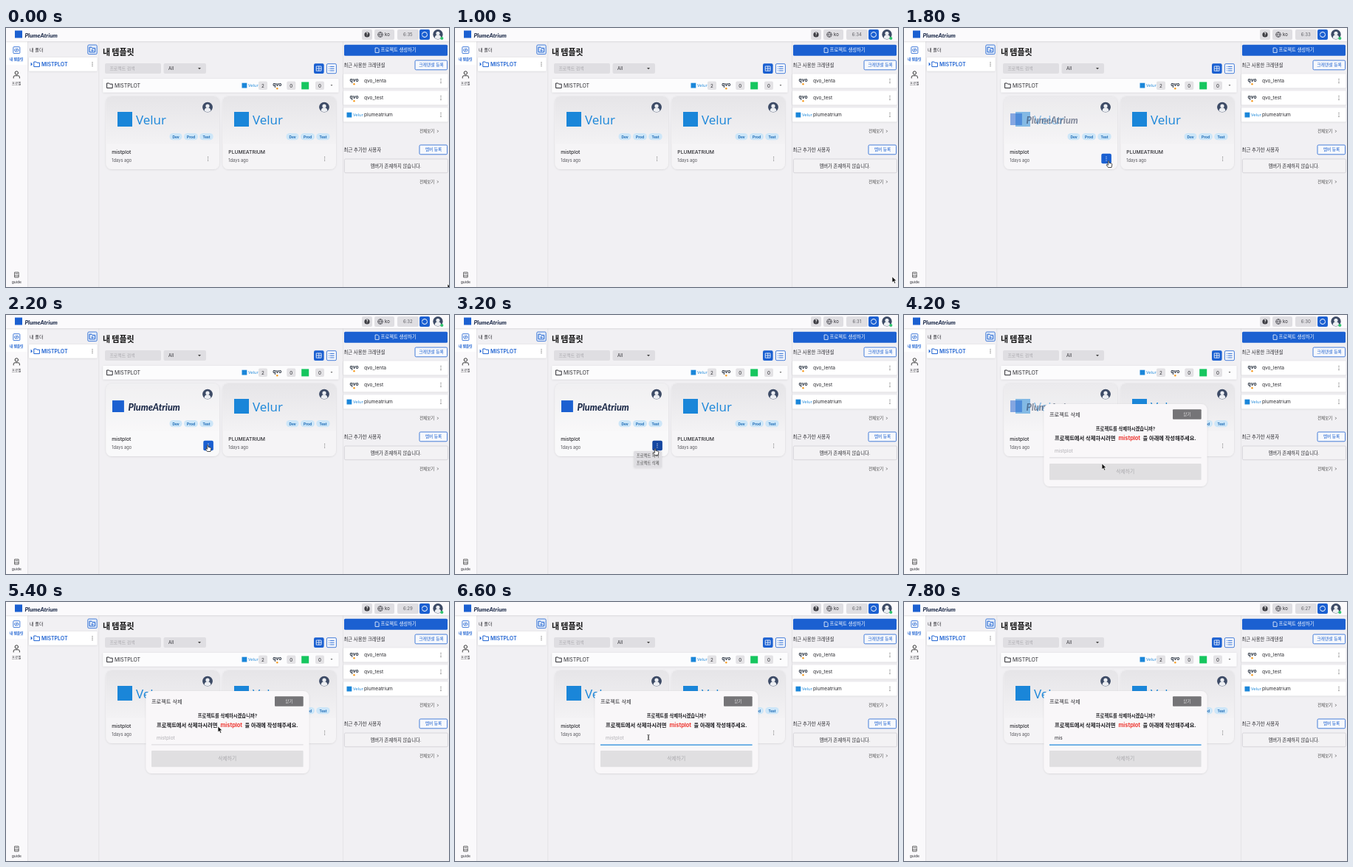
An HTML page for the animation above (8 s loop, 600 by 352 pixels).

```html
<!DOCTYPE html>
<html lang="ko">
<head>
<meta charset="utf-8">
<title>템플릿</title>
<style>
html, body { margin: 0; height: 100%; overflow: hidden; background: #f1f0f3; }
svg { display: block; width: 100vw; height: 100vh; }
text { font-family: Inter, "Noto Sans CJK KR", "Noto Sans CJK", sans-serif; white-space: pre; }
.brand { font-family: Lato, sans-serif; font-style: italic; }
.vendor { font-family: "Open Sans", sans-serif; }
</style>
</head>
<body>
<svg id="stage" viewBox="0 0 600 352"></svg>
<script>
const BLUE = '#1b60d1', INK = '#2b2b30', SKY = '#1a86d9', FIELD = '#dfdee2', SOFT = 'filter="url(#soft)"';

const rect = (x, y, w, h, fill, r = 0, extra = '') =>
  `<rect x="${x}" y="${y}" width="${w}" height="${h}" fill="${fill}" rx="${r}" ${extra}/>`;
const outline = (x, y, w, h, stroke, r = 1.5, fill = '#f6f8fc') =>
  rect(x, y, w, h, fill, r, `stroke="${stroke}" stroke-width=".8"`);
const circle = (x, y, r, fill, extra = '') => `<circle cx="${x}" cy="${y}" r="${r}" fill="${fill}" ${extra}/>`;
const line = (d, stroke = INK, w = .8, fill = 'none') =>
  `<path d="${d}" stroke="${stroke}" stroke-width="${w}" fill="${fill}" stroke-linecap="round" stroke-linejoin="round"/>`;
const shape = (d, fill) => `<path d="${d}" fill="${fill}"/>`;
const text = (x, y, size, str, fill = INK, weight = 400, anchor = 'start', extra = '') =>
  `<text x="${x}" y="${y}" font-size="${size}" fill="${fill}" font-weight="${weight}" text-anchor="${anchor}" ${extra}>${str}</text>`;
const mid = (x, y, size, str, fill, weight) => text(x, y, size, str, fill, weight, 'middle');
const group = (id, body, extra = '') => `<g id="${id}" ${extra}>${body}</g>`;

const dots = (x, y, fill = '#444') => [-2.4, 0, 2.4].map(d => circle(x, y + d, .6, fill)).join('');
const folder = (x, y, c) => line(`M${x} ${y}h2.6l1 1.2h3.6v5.4h-7.2z`, c, 1);
const caret = (x, y, s = 2) => shape(`M${x - s} ${y - 1}h${2 * s}l${-s} ${s * 1.1}z`, '#444');
const avatar = (x, y, r) => circle(x, y, r, '#3d4b66') +
  circle(x, y - r * .22, r * .38, '#eceef2') +
  shape(`M${x - r * .66} ${y + r * .7}q${r * .1} ${-r * .62} ${r * .66} ${-r * .62}t${r * .66} ${r * .62}q${-r * .66} ${r * .5} ${-r * 1.32} 0z`, '#eceef2');

const brand = (x, y, s) => rect(x, y - 10 * s, 10 * s, 10 * s, BLUE) +
  text(x + 13.5 * s, y - s, 7.9 * s, 'PlumeAtrium', '#1d2b4a', 800, 'start', 'class="brand"');
const velur = (x, y, s) => rect(x, y - 18.5 * s, 20 * s, 20 * s, SKY) +
  text(x + 25 * s, y - 1.5 * s, 17 * s, 'Velur', SKY, 400, 'start', 'class="vendor"');
const qvo = (x, y) => text(x, y, 6.6, 'qvo', '#252f3e', 700, 'middle', 'class="vendor"') + circle(x, y + 3.2, 1.2, '#f79a1c');

function header() {
  return rect(0, 0, 600, 18, '#fbfafc', 0, SOFT) + brand(12, 13.5, 1) +
    rect(482, 2, 14, 14, FIELD, 2) + circle(489, 9, 3.6, '#3c3c42') + mid(489, 11.1, 5.6, '?', '#fff', 700) +
    rect(499, 2, 27, 14, FIELD, 2) + circle(507, 9, 3.4, 'none', 'stroke="#3c3c42" stroke-width=".7"') +
    line('M503.6 9h6.8M507 5.6q-3.2 3.4 0 6.8q3.2-3.4 0-6.8', '#3c3c42', .6) + text(513, 11.2, 6, 'ko') +
    rect(530, 2, 29, 14, FIELD, 2) + text(544.3, 11.2, 6, '', '#606066', 400, 'middle', 'id="clock"') +
    rect(560, 2, 14, 14, BLUE, 2) + circle(567, 9, 3.5, 'none', 'stroke="#fff" stroke-width="1" stroke-dasharray="10 1"') +
    avatar(585, 8.8, 6.7) + circle(590.3, 14, 2.1, '#2fc56d');
}

function sidebar() {
  return rect(0, 18, 29, 334, '#faf9fb') + rect(0, 19, 29, 31, '#fff') + rect(29, 18.7, .7, 334, '#dedde0') +
    outline(9.8, 25.6, 9, 9, BLUE, 1) + line('M12.9 28.3l-1.4 1.8 1.4 1.8M15.7 28.3l1.4 1.8-1.4 1.8M14.7 28.1l-.8 4', BLUE, .9) +
    mid(14.2, 44.2, 4.7, '내 템플릿', BLUE, 600) +
    circle(14.3, 61, 2.2, 'none', 'stroke="#333" stroke-width="1"') + line('M10.2 68v-1.2q0-2 2-2h4.2q2 0 2 2v1.2', '#333', 1) +
    mid(14.2, 77, 4.6, '프로필') +
    line('M11.6 338.5v-6.5h5.5v6.5zM11.6 336.8h5.5M13 334h2.7', '#444', .8) + mid(14.3, 347, 5, 'guide');
}

function folders() {
  return text(32, 32, 6.1, '내 폴더') + outline(110.8, 23, 12.4, 12.6, BLUE, 1.5, '#e3ecf9') + folder(113.4, 26.2, BLUE) +
    line('M117 28.8v3M115.5 30.3h3', BLUE, .7) +
    rect(31, 40, 92.5, 18.5, '#fff', 1, SOFT) + shape('M33.6 46.6l2.3 2.6-2.3 2.6z', BLUE) +
    folder(38.2, 46, BLUE) + text(48, 51.6, 7, 'MISTPLOT', BLUE, 600) + dots(117, 49.2) +
    rect(125.5, 18.7, .7, 334, '#dedde0');
}

function card(x, title, logo) {
  const tag = (dx, w, s) => rect(x + dx, 143, w, 9.3, '#cde6f8', 4.6) + mid(x + dx + w / 2, 149.5, 4.8, s, '#1767b4', 700);
  return rect(x + .4, 93, 153.6, 99, '#f5f4f6', 8, SOFT) +
    shape(`M${x + .4} 157.5V101q0-8 8-8h137.6q8 0 8 8v56.5z`, 'url(#shade)') +
    logo + avatar(x + 138, 107.6, 6.9) + tag(86.5, 17, 'Dev') + tag(106, 19, 'Prod') + tag(127.2, 18.5, 'Test') +
    text(x + 8.3, 170.8, 6.8, title, INK, 500) + text(x + 8.3, 182, 5.7, '1days ago', '#55555a') + dots(x + 138.6, 177.8, '#777');
}

function main() {
  const count = (x, n) => rect(x, 72.5, 12, 11.5, '#e3e2e5', 2) + mid(x + 6, 80.6, 6.2, n);
  const glow = rect(135.4, 93, 153.6, 99, '#fff', 8, 'id="glow"');
  return text(131, 37.2, 11, '내 템플릿', '#111', 900) +
    rect(134, 48, 76, 14, FIELD, 2) + text(140.4, 57.2, 5.9, '프로젝트 검색', '#a9a8ad') +
    rect(213.5, 48, 57.5, 14, FIELD, 2) + text(220, 57.2, 6, 'All') + caret(262, 55) +
    rect(417, 48.3, 13.6, 13.6, BLUE, 2) + line('M420.6 52h6.4v6.2h-6.4zM423.8 52v6.2M420.6 55.1h6.4', '#fff') +
    outline(434.4, 48.7, 13, 13, BLUE) + line('M439.2 52.4h5M439.2 55.2h5M439.2 58h5M437.3 52.4h.1M437.3 55.2h.1M437.3 58h.1', BLUE, .9) +
    rect(131.3, 69, 319.2, 18.5, '#fcfcfd', 1, SOFT) + folder(137, 75, INK) +
    text(147, 80.6, 7, 'MISTPLOT') + velur(319.5, 81, .34) + count(342, 2) + qvo(367.3, 79) + count(380.3, 0) +
    rect(400.2, 73.4, 10, 10, '#16c65f') + count(419, 0) + caret(441, 78.3, 1.4) +
    card(135, 'mistplot', glow + group('plain', velur(151, 132.5, 1)) + group('swap', brand(144, 132, 1.59))) +
    card(293, 'PLUMEATRIUM', velur(309, 132.5, 1)) +
    group('more', rect(267.3, 170.7, 13.6, 13.6, BLUE, 2, 'id="moreBox"') + dots(274, 177.6, '#fff'));
}

function panel() {
  const row = (y, logo, name) => rect(457, y, 141.5, 18.6, '#fff', 1, SOFT) + logo +
    text(485, y + 11.3, 6.6, name) + dots(589, y + 9.4);
  const seeAll = y => text(560.3, y, 5.4, '전체보기', '#444') + line(`M584.4 ${y - 3.2}l1.1 1.2-1.1 1.2`, '#444', .7);
  return rect(456, 18.7, .7, 334, '#dedde0') +
    rect(458, 22.7, 140, 15, BLUE, 1.5) + line('M500.5 27h3l1.6 1.7v4.7h-4.6z', '#fff') + text(507.6, 32.4, 6.3, '프로젝트 생성하기', '#fff', 500) +
    text(457.5, 52.6, 6.3, '최근 사용한 크레덴셜') + outline(554, 44, 43.6, 12.8, BLUE) + mid(576, 52.4, 5.8, '크레덴셜 등록', BLUE) +
    row(62.6, qvo(471.5, 73), 'qvo_lenta') + row(85.6, qvo(471.5, 96), 'qvo_test') + row(108.6, velur(461.5, 121, .34), 'plumeatrium') +
    seeAll(142.3) + text(457.5, 167.7, 6.4, '최근 추가한 사용자') + outline(560, 159, 37.6, 12.8, BLUE) + mid(579, 167.4, 5.7, '멤버 등록', BLUE) +
    outline(458.4, 178, 140, 18.8, '#d0cfd3', 1.5, '#f3f2f4') + mid(528, 189.8, 6.3, '멤버가 존재하지 않습니다.') + seeAll(211);
}

function overlays() {
  return group('menu', rect(242.3, 185, 37.7, 22.5, FIELD, 1, SOFT) +
      rect(242.3, 196.5, 37.7, 10, '#cfced3', 0, 'id="menuHover"') +
      mid(261.2, 192.6, 5.3, '프로젝트 복사', '#444') + mid(261.2, 203.2, 5.3, '프로젝트 삭제', '#444')) +
    group('modal', rect(189.5, 121, 221, 112, '#f9f7f9', 8, SOFT) +
      text(197, 137.5, 7.2, '프로젝트 삭제') + rect(364, 128.3, 38.7, 13.5, '#757477', 1) + mid(383.4, 136.9, 5.4, '닫기', '#e4e3e5') +
      mid(300, 156.8, 6.3, '프로젝트를 삭제하시겠습니까?', '#1c1c20', 600) +
      text(204, 169.6, 7.3, '프로젝트에서 삭제하시려면', '#1c1c20', 600) + mid(305.3, 169.6, 7.4, 'mistplot', '#ee3a34', 700) +
      text(323.6, 169.6, 7.2, '을 아래에 작성해주세요.', '#1c1c20', 600) +
      text(204, 187, 6.6, '', INK, 400, 'start', 'id="field"') + rect(197, 193.6, 205.6, .7, '#c9c8cc', 0, 'id="rule"') +
      rect(197, 202, 205.6, 22.3, '#e0dfe1', 1) + mid(299.8, 215.4, 6.8, '삭제하기', '#a9a8ac'));
}

const cursors =
  group('arrow', line('M0 0v8l1.9-1.7 1.4 3 1.5-.7-1.4-2.9h2.5z', '#fff', .7, '#111')) +
  group('hand', line('M-.7 0q.8-.8 1.5 0v2.4l3.3.8q.9.3.7 1.6l-.8 3.7h-4.4l-2.6-3.4q.3-1.2 2.3 0z', '#222', .8, '#fff')) +
  group('beam', line('M-1.2-3.6q1.2 0 1.2 1v5.2q0 1-1.2 1M1.2-3.6q-1.2 0-1.2 1v5.2q0 1 1.2 1', '#222', .7));

stage.innerHTML = `<defs>
  <linearGradient id="shade" x2="0" y2="1"><stop stop-color="#e6e5e8"/><stop offset="1" stop-color="#f3f2f4"/></linearGradient>
  <filter id="soft" x="-10%" y="-20%" width="120%" height="150%"><feDropShadow dx="0" dy=".5" stdDeviation=".9" flood-opacity=".13"/></filter>
  </defs>` + rect(0, 0, 600, 352, '#f1f0f3') + sidebar() + folders() + main() + panel() + header() + overlays() + group('pointer', cursors);

const $ = id => document.getElementById(id);
const show = (id, on) => $(id).setAttribute('opacity', +on);
const ramp = (t, from, span) => Math.min(1, Math.max(0, (t - from) / span));

// time, x, y of the pointer tip
const path = [
  [0, 598, 348], [800, 598, 348], [1000, 592, 338], [1200, 520, 301], [1400, 400, 240], [1600, 305, 196],
  [1800, 277, 181], [2200, 273, 177], [2800, 272, 177], [3200, 271, 182], [3800, 268, 202], [4400, 268, 202],
  [5200, 287, 169], [5800, 287, 169], [6200, 262, 184], [8000, 262, 184]
];

function pointerAt(t) {
  const i = path.findIndex(p => p[0] > t), a = path[i - 1], b = path[i];
  const k = (t - a[0]) / (b[0] - a[0]);
  return [a[1] + (b[1] - a[1]) * k, a[2] + (b[2] - a[2]) * k];
}

function draw(now) {
  const t = Math.floor(now % 8000 / 200) * 200; // the picture advances five times a second
  const left = 395 - Math.ceil((t + 1 - 200) / 1000);
  $('clock').textContent = `${Math.floor(left / 60)}:${left % 60}`;

  const swap = ramp(t, 1600, 400) - ramp(t, 4000, 400);
  show('swap', swap);
  show('plain', 1 - swap);
  show('glow', swap * .4);

  show('more', t >= 1800 && t < 4000);
  $('moreBox').setAttribute('fill', t >= 3000 ? '#1546a0' : BLUE);
  show('menu', t >= 3000 && t < 4000);
  show('menuHover', t >= 3600);
  show('modal', ramp(t, 3800, 400));

  const typed = 'mis'.slice(0, t < 7000 ? 0 : t < 7400 ? 1 : t < 7600 ? 2 : 3);
  $('field').textContent = typed || 'mistplot';
  $('field').setAttribute('fill', typed ? INK : '#b0afb4');
  const focus = t >= 6400;
  $('rule').setAttribute('fill', focus ? SKY : '#c9c8cc');
  $('rule').setAttribute('height', focus ? 1.2 : .7);

  const [x, y] = pointerAt(t);
  const kind = t >= 1800 && t < 4000 ? 'hand' : t > 4000 && y > 178 && y < 194 ? 'beam' : 'arrow';
  for (const id of ['arrow', 'hand', 'beam']) show(id, id === kind);
  $('pointer').setAttribute('transform', `translate(${x} ${y})`);
  show('pointer', t < 7000);
}

function tick() {
  draw(performance.now());
  requestAnimationFrame(tick);
}
tick();
</script>
</body>
</html>
```
